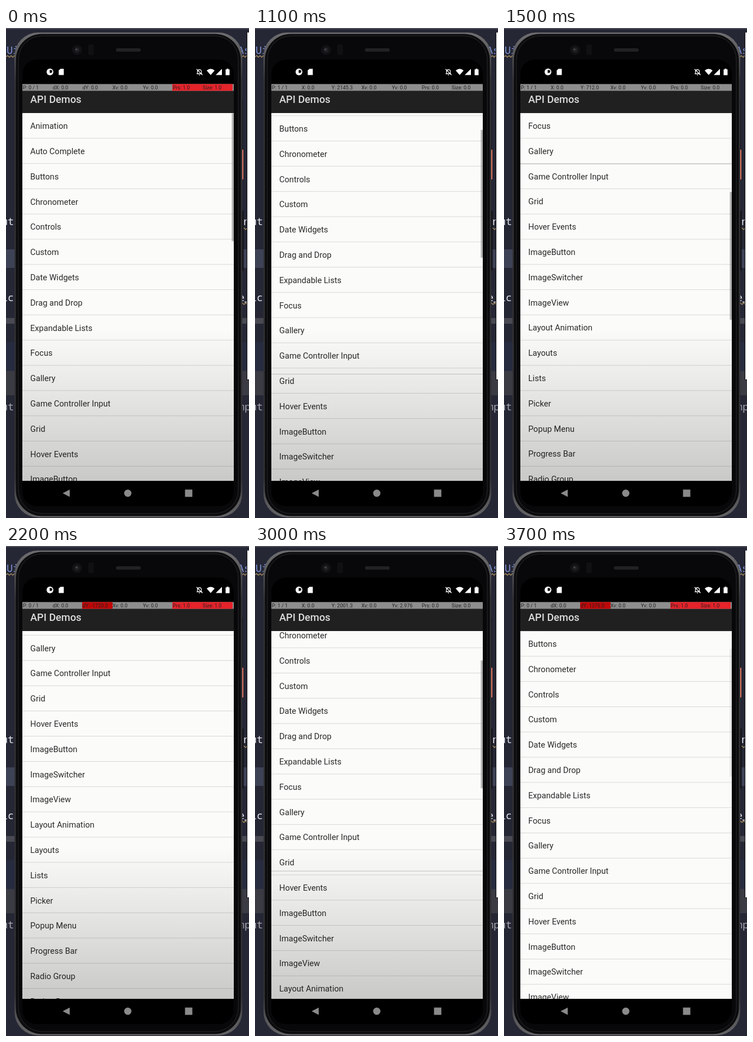
Write an HTML page that moves like this. It is 431 px wide and 870 px high and loops after 3.8 s.

```html
<!DOCTYPE html>
<html lang="en">
<head>
<meta charset="utf-8">
<title>List scrolling on a phone</title>
<style>
html, body { margin: 0; width: 100%; height: 100%; overflow: hidden; background: #262735; }
svg { display: block; width: 431px; height: 870px; font-family: Roboto, sans-serif; }
.code { font: 18.5px "Noto Sans Mono", monospace; fill: #e2e4ea; }
.wave { fill: none; stroke: #b59a62; stroke-width: 1.2; }
#rows text { font-size: 14.6px; fill: #2a2a2a; }
#strip text { font-size: 9px; fill: #222; }
</style>
</head>
<body>
<svg viewBox="0 0 431 870">
  <defs>
    <linearGradient id="shade" x2="0" y2="1">
      <stop stop-opacity="0"/><stop offset="1" stop-opacity=".2"/>
    </linearGradient>
    <linearGradient id="rim" x2="0" y2="1">
      <stop stop-color="#6e6e70"/><stop offset=".04" stop-color="#5c5c5e"/>
      <stop offset=".1" stop-color="#323235"/><stop offset=".92" stop-color="#323235"/>
      <stop offset=".97" stop-color="#59595b"/><stop offset="1" stop-color="#626264"/>
    </linearGradient>
    <clipPath id="list"><path d="M29 151H404V804H29Z"/></clipPath>
  </defs>

  <!-- editor behind the phone -->
  <path fill="#262735" d="M0 0H431V870H0Z"/>
  <path fill="#4b4c55" d="M0 0H431V2H0Z"/>
  <path fill="#3e4257" d="M0 393H431V426H0Z"/>
  <path fill="#484952" d="M0 515H431V525H0Z"/>
  <path fill="#272c40" d="M0 558H431V609H0Z"/>
  <path fill="#3a3b43" d="M0 609H431V652H0Z"/>
  <g class="code">
    <text x="1" y="46" style="fill:#7d93d2">Ui</text>
    <text x="411" y="46" style="fill:#7d93d2">As</text>
    <text x="-8" y="350">ut</text><text x="421" y="350">n</text>
    <text x="-8" y="485">lc</text><text x="412" y="485">e_</text>
    <text x="-8" y="679" style="fill:#a3a4ab">ut</text>
    <text x="412" y="679" style="fill:#a3a4ab">mp</text>
  </g>
  <path class="wave" d="M0 51l3-2 3 3 3-3 3 3 3-3 3 3M412 51l3-2 3 3 3-3 3 3 3-3M419 357l3-2 3 3 3-3M416 490l3-2 3 3 3-3 3 3"/>
  <path fill="#f2f2f4" d="M428 8H431V625H428Z"/>
  <path fill="none" stroke="#111" d="M427.5 8V624.5H431"/>

  <!-- phone -->
  <rect x="417" y="128" width="3" height="142" fill="#17171b"/>
  <rect x="418" y="216" width="3" height="53" rx="1" fill="#dc7560"/>
  <rect x="418" y="324" width="3.5" height="107" rx="1" fill="#15151a"/>
  <rect x="15" y="8" width="404" height="861" rx="42" fill="url(#rim)"/>
  <rect x="17.5" y="10.5" width="399" height="856" rx="46" fill="#0c0c0e"/>
  <rect x="22" y="14" width="390" height="848" rx="42" fill="#08080a" stroke="#29292c"/>
  <rect x="29" y="56" width="375" height="793" rx="26"/>
  <circle cx="126" cy="39" r="9" fill="#121214"/>
  <circle cx="126" cy="39" r="4.5" fill="#1f2024"/>
  <circle cx="125" cy="38" r="1.6" fill="#4a4b50"/>
  <rect x="146" y="29" width="10" height="19" rx="2" fill="#101012"/>
  <rect x="195" y="36" width="44" height="6" rx="3" fill="#222225"/>

  <!-- status icons -->
  <g fill="#fff">
    <circle cx="78" cy="78" r="6"/>
    <path fill="#000" d="M77.500 74.500H79.500A2.600 2.600 0 0 1 79.500 79.700H77.500Z"/>
    <path d="M96.500 72.500H102.500V83.500H93.500V75.500Z"/>
    <path d="M356 75.500Q363 69.500 370 75.500L363 83.500Z"/>
    <path d="M383 72.500V83.500H372Z"/>
    <path d="M389.500 73.500H391.500V72.300H394.500V73.500H396.500V83.700H389.500Z"/>
    <path fill="none" stroke="#fff" stroke-width="1.200" d="M339.500 81V77Q340 74 343 73.800Q346.500 74 346.500 77V81ZM338 81.500H348M342 83.500H344M338 73L348.500 83.500"/>
  </g>

  <!-- navigation -->
  <g fill="#8a8a8a">
    <path d="M100.500 826L113 819.500V832.500Z"/>
    <circle cx="216" cy="826" r="6.500"/>
    <path d="M317.500 819.500H330.500V832.500H317.500Z"/>
  </g>

  <!-- app -->
  <path fill="#fbfbf9" d="M29 151H404V804H29Z"/>
  <g clip-path="url(#list)">
    <g id="rows"></g>
    <rect id="bar" x="400.5" width="3.5" height="227" fill="#777" fill-opacity=".55"/>
    <rect id="dim" x="29" y="535" width="375" height="269" fill="url(#shade)"/>
  </g>
  <path fill="#202020" d="M29 111H404V151H29Z"/>
  <text x="43" y="133" font-size="18.2" font-weight="500" fill="#dcdcdc">API Demos</text>
  <path fill="#8e8e8e" d="M29 99.500H404V111.500H29Z"/>
  <g id="strip"></g>
  <path id="cross" fill="none" stroke="#8c8c8c" stroke-opacity=".5"/>
</svg>
<script>
const ROW = 44.8, SCALE = 375 / 1440, LOOP = 3800, TICK = 100;
const items = ['Animation', 'Auto Complete', 'Buttons', 'Chronometer', 'Controls', 'Custom',
  'Date Widgets', 'Drag and Drop', 'Expandable Lists', 'Focus', 'Gallery', 'Game Controller Input',
  'Grid', 'Hover Events', 'ImageButton', 'ImageSwitcher', 'ImageView', 'Layout Animation', 'Layouts',
  'Lists', 'Picker', 'Popup Menu', 'Progress Bar', 'Radio Group', 'Rating Bar', 'Rotating Button'];

// [time, value] points joined by straight lines
const scrollPath = [[1000, 0], [1300, 254.3], [1500, 403.2], [1600, 440.5],
  [2700, 440.5], [3000, 149.4], [3100, 89.6]];
const touchPath = [[1000, 2432], [1300, 1572], [1500, 712], [1600, 712],
  [2700, 856], [3000, 2001.3], [3100, 2232]];
const barPath = [[1800, 1], [2200, 0], [2700, 0], [2800, 1], [3400, 1], [3700, .3]];
const dimPath = [[3200, 1], [3700, 0]];

const $ = id => document.getElementById(id);

function at(path, t) {
  const i = path.findIndex(p => p[0] > t);
  if (i < 0) return path[path.length - 1][1];
  if (!i) return path[0][1];
  const [t0, a] = path[i - 1], [t1, b] = path[i];
  return a + (b - a) * (t - t0) / (t1 - t0);
}

$('rows').innerHTML = items.map((name, i) => {
  const y = 151.5 + i * ROW;
  return `<text x="43" y="${y + 27.6}">${name}</text>
    <rect x="29" y="${y + ROW - 1}" width="375" height="1" fill="#d8d8d7"/>`;
}).join('');

function stripCells(t, touching, y) {
  const down = t === 1000 || t === 2700;
  const second = t >= 2700;
  const delta = t < 1000 ? '0.0' : second ? '1376.0' : '-1720.0';
  const yv = touching && t > 2700 ? '2.976' : '0.0';
  const hot = !touching || down ? '#e5232a' : '';
  const force = hot ? '1.0' : '0.0';
  return [
    [`P: ${+touching} / 1`],
    [touching ? 'X: 0.0' : 'dX: 0.0'],
    touching ? ['Y: ' + y.toFixed(1)] : ['dY: ' + delta, t < 1000 ? '' : '#c00808'],
    ['Xv: 0.0'], ['Yv: ' + yv], ['Prs: ' + force, hot], ['Size: ' + force, hot]
  ];
}

function draw(t) {
  const scroll = at(scrollPath, t), y = at(touchPath, t);
  const touching = t >= 1000 && t < 1600 || t >= 2700 && t < 3300;
  $('rows').setAttribute('transform', `translate(0 ${-scroll})`);
  $('bar').setAttribute('y', 151.5 + scroll * .346);
  $('bar').setAttribute('opacity', at(barPath, t));
  $('dim').setAttribute('opacity', at(dimPath, t));
  $('cross').setAttribute('d', touching ? `M29 ${56 + y * SCALE}H404` : '');
  $('strip').innerHTML = stripCells(t, touching, y).map(([label, fill], i) => {
    const x = Math.floor(29 + i * 53.3);
    return `<rect x="${x}" y="99.5" width="54" height="12" fill="${fill || 'none'}"/>
      <text x="${x + .8}" y="109">${label}</text>`;
  }).join('');
}

let last = -1;
const start = performance.now();
function frame(now) {
  const t = Math.floor(Math.max(0, now - start) % LOOP / TICK) * TICK;
  if (t !== last) draw(last = t);
  requestAnimationFrame(frame);
}
draw(0);
requestAnimationFrame(frame);
</script>
</body>
</html>
```
